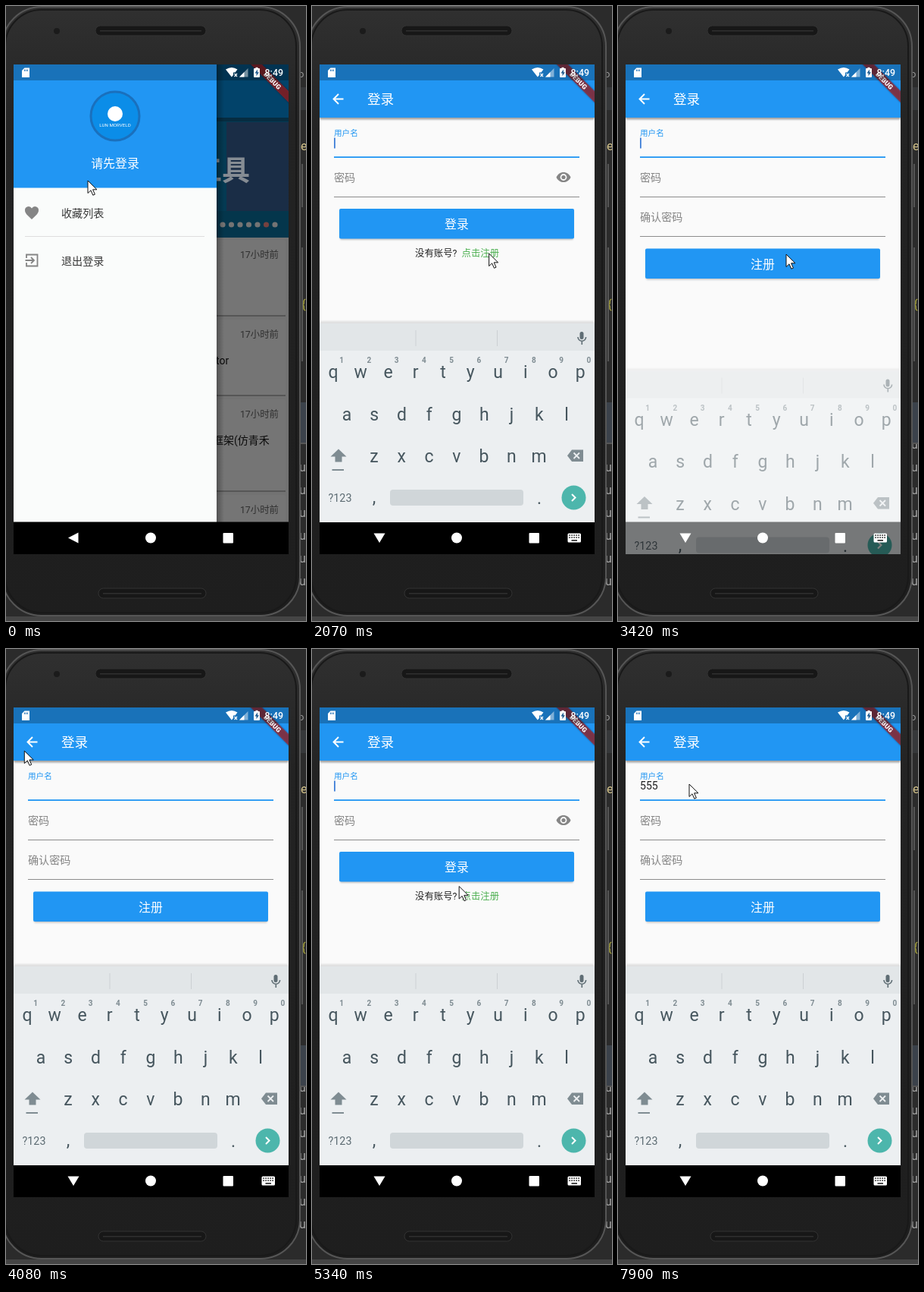
Animation of 396x810 px, one loop 8000 ms. Source, as an HTML page:

```html
<!DOCTYPE html>
<html lang="zh-CN">
<head>
<meta charset="utf-8">
<title>Login and register flow</title>
<style>
html, body { margin: 0; width: 396px; height: 810px; overflow: hidden; background: #2b2b2b; }
svg { display: block; font-family: Roboto, 'Noto Sans CJK SC', 'Noto Sans CJK', sans-serif; }
</style>
</head>
<body>
<svg id="stage" width="396" height="810" viewBox="0 0 396 810"></svg>
<script>
const BLUE = '#2196f3', GREY = '#858585';
const MID = 'text-anchor="middle"', END = 'text-anchor="end"';
const $ = id => document.getElementById(id);
const text = (s, x, y, size, fill, extra = '') =>
  `<text x="${x}" y="${y}" font-size="${size}" fill="${fill}" ${extra}>${s}</text>`;
const rect = (x, y, w, h, fill, extra = '') =>
  `<rect x="${x}" y="${y}" width="${w}" height="${h}" fill="${fill}" ${extra}/>`;
const path = (d, fill, extra = '') => `<path d="${d}" fill="${fill}" ${extra}/>`;
const line = (d, stroke, width) => path(d, 'none', `stroke="${stroke}" stroke-width="${width}"`);
const circle = (x, y, r, fill, extra = '') =>
  `<circle cx="${x}" cy="${y}" r="${r}" fill="${fill}" ${extra}/>`;
const shadow = (x, y, w, h, opacity) =>
  rect(x, y, w, h, '#000', `rx="2" opacity="${opacity}" filter="url(#blur)"`);
const repeat = (n, make) => Array.from({ length: n }, (_, i) => make(i)).join('');

// Desktop editor showing beside the phone, and the phone body
function surroundings() {
  const slot = (x, y, w) => rect(x, y, w, 13, '#171717', 'rx="6.5" stroke="#333"') +
    rect(x + 6, y + 6, w - 12, 1.5, '#303030');
  return rect(0, 0, 396, 810, '#2b2b2b') +
    rect(386, 107, 10, 30, '#36383a') +
    repeat(7, i => text('u', 387, 582.5 + 30 * i, 16, '#a5a5a5', `id="log${i}"`)) +
    rect(386, 522, 10, 53, '#3b424b') + rect(386, 575, 10, 2, '#565656') +
    text('o', 386, 94, 13, '#999') + text('e', 389, 190, 16, '#d6c58b') +
    text('{', 390, 399, 17, '#a9a53d') +
    rect(390, 208, 2, 57, '#555') + rect(390, 318, 2, 150, '#555') +
    rect(0, 804, 396, 6, '#454545') +
    rect(-5, 1, 393, 802, 'url(#body)', 'rx="52" stroke="#565656" stroke-width="2"') +
    rect(-1, 5, 384, 794, 'none', 'rx="48" stroke="#191919" stroke-width="2"') +
    slot(118, 26, 146) + slot(122, 767, 142) + circle(67, 33, 4, '#1b1b1b');
}

function home() {
  const card = (y, h) => rect(278, y, 91, h, '#757575', 'rx="2"') +
    rect(278, y + h, 91, 2, '#565656') + text('17小时前', 360, y + 24, 12.4, '#303030', END);
  return rect(10, 77, 363, 603, '#727272') +
    rect(10, 77, 363, 70, '#02436a') + rect(10, 147, 363, 158, '#043a53') +
    rect(10, 147, 363, 5, '#062c41') + rect(291, 153, 82, 117, '#1a2d46') +
    text('工具', 248, 230, 37, '#858c93', 'font-weight="700"') + rect(10, 270, 363, 35, '#04364c') +
    repeat(7, i => circle(286 + 11.5 * i, 288, 3.6, i === 5 ? '#75413f' : '#747474')) +
    card(308, 99) + card(413, 99) + card(518, 120) + card(644, 40) +
    text('tor', 277, 472, 14, '#0c0c0c') + text('框架(仿青禾', 273, 577, 14, '#0c0c0c');
}

function drawer() {
  return rect(278, 77, 10, 603, 'url(#edge)') + rect(10, 77, 268, 603, '#fafcfb') +
    rect(10, 77, 268, 162.5, BLUE) +
    circle(144, 145, 32, '#0b8de8', 'stroke="#1a70bd" stroke-width="3"') +
    circle(144, 142, 10, '#fff') +
    text('LUN MORVELD', 144, 159, 6.2, '#fff', MID) +
    text('请先登录', 144, 213, 15.9, '#fff', MID) +
    path('M34 281C28 275.5 25 273 25 269a4.8 4.8 0 0 1 9-2.5 4.8 4.8 0 0 1 9 2.5c0 4-3 6.5-9 12z', GREY) +
    text('收藏列表', 73, 278, 14.1, '#363636') + rect(25, 303, 237, 1, '#dedede') +
    line('M27 332v-4.5h14.5v15H27v-4.5M25.5 335h11M33 331l4 4-4 4', GREY, 1.8) +
    text('退出登录', 73, 341, 14.1, '#363636');
}

const field = (label, y) =>
  text(label, 29, y + 5.4, 14.1, GREY) + rect(29, y + 25, 324, 1, '#8c8c8c');

const button = (label, y) => shadow(37, y + 2, 308, 39, .22) +
  rect(36, y, 310, 39.5, BLUE, 'rx="2"') + text(label, 191, y + 26, 15.9, '#fff', MID);

function page(id, rest, ripple = '') {
  return `<g id="${id}">` + rect(10, 77, 363, 640, '#fafafa') +
    shadow(10, 140, 363, 9.5, .35) + rect(10, 77, 363, 70, BLUE) + ripple +
    line('M41.5 122.5H28.5M35 116l-6.5 6.5L35 129', '#fff', 1.9) +
    text('登录', 73, 129.3, 17.6, '#fff') +
    text('用户名', 29, 0, 14, BLUE, `id="${id}Label"`) +
    rect(29, 198, 324, 2, BLUE, `id="${id}Line"`) +
    rect(29, 173.5, 1.8, 14, '#3f7fd8', `id="${id}Caret"`) +
    field('密码', 226) + rest + '</g>';
}

const loginRest =
  path('M322.5 225.5c1.6-4 5.3-6.6 9.5-6.6s7.9 2.6 9.5 6.6c-1.6 4-5.3 6.6-9.5 6.6s-7.9-2.6-9.5-6.6z', GREY) +
  circle(332, 225.5, 4.4, '#fafafa') + circle(332, 225.5, 2.6, GREY) +
  button('登录', 267) + text('没有账号?', 136, 329.5, 12.4, '#222') +
  text('点击注册', 197.5, 329.5, 12.4, '#4caf50');

const registerRest = field('确认密码', 278) + button('注册', 319.5) +
  text('', 29, 185.3, 14.1, '#222', 'id="typed"');

function keyboard() {
  const ink = '#46565e', soft = '#7f8c92', step = 36.25;
  const row = (keys, x, y, size = 23, fill = ink, extra = '') =>
    repeat(keys.length, i => text(keys[i], x + step * i, y, size, fill, MID + extra));
  return shadow(10, 415, 363, 6, .1) +
    rect(10, 418, 363, 262, '#eceff1') + rect(10, 418, 363, 36, '#e2e6e8') +
    rect(136.5, 427, 1, 21, '#cbd0d3') + rect(244, 427, 1, 21, '#cbd0d3') +
    rect(353.5, 429, 5, 10, '#5f6d74', 'rx="2.5"') +
    line('M351 436a5.3 5.3 0 0 0 10.6 0M356.3 441v5', '#5f6d74', 1.6) +
    row('1234567890', 39, 470, 10, soft, ' font-weight="700"') +
    row('qwertyuiop', 28, 490) + row('asdfghjkl', 46, 545.5) + row('zxcvbnm', 82, 601) +
    path('M35 583.5l10.5 10h-6v7h-9v-7h-6z', soft) + rect(26.5, 610, 15.5, 2, soft) +
    path('M343 584.5h15v15.5h-15l-6-7.75z', soft) +
    line('M345.5 588.5l7.5 7.5M353 588.5l-7.5 7.5', '#eceff1', 1.8) +
    text('?123', 37, 653, 14.3, '#5c6b72', MID) + text(',', 82, 655, 23, ink, MID) +
    rect(103, 637, 176, 21, '#d0d6d9', 'rx="4"') + text('.', 300, 656, 23, ink, MID) +
    circle(345.5, 647.5, 16, '#4db6ac') + line('M343 643l4.5 4.5-4.5 4.5', '#fff', 2);
}

function statusBar() {
  return '<g transform="translate(373 77) rotate(45)">' +
    shadow(-40, 24.7, 80, 10.6, .4) + rect(-40, 24.7, 80, 10.6, '#b71c1c', 'opacity=".63"') +
    text('DEBUG', 0, 33.2, 8.8, '#fff', MID + ' font-weight="900"') + '</g>' +
    rect(10, 77, 363, 21, '#000', 'opacity=".24"') +
    path('M24.5 81.5h6.5v12.5H21V85z', '#fff') +
    line('M24.5 83.5v2.5M26.5 83.5v2.5M28.5 83.5v2.5', '#1f70b6', 1) +
    path('M290 83.5q8-5 15.5 0l-3 4h-2.5v3.5l-2.2 2.5z', '#fff') +
    line('M301.5 89l3.5 4M305 89l-3.5 4', '#fff', 1.2) +
    path('M308 93.5h11.5V82z', '#fff', 'opacity=".45"') + path('M308 93.5h6.5V87z', '#fff') +
    rect(327, 82, 8, 12, '#fff', 'rx="1"') + rect(329.5, 80.8, 3, 2, '#fff') +
    path('M332 83.5l-3.5 5h2v3.8l3.5-5h-2z', '#235e91') +
    text('8:49', 366, 92.2, 12.4, '#fff', END + ' font-weight="500"');
}

function navIcons() {
  return path('M95.5 693.5v14L82 700.5z', '#fff', 'id="back"') +
    circle(191, 700.5, 7, '#fff') + rect(286.5, 694, 13.5, 13.5, '#fff', 'rx="1"') +
    '<g id="ime">' + path('M81.5 694.5h15L89 707z', '#fff') +
    rect(337.5, 694.5, 17.5, 12, '#fff', 'rx="1.5"') +
    repeat(10, i => rect(339.3 + 3 * (i % 5), i < 5 ? 696.3 : 699.3, 1.6, 1.6, '#222')) +
    rect(342.5, 703, 7.5, 1.6, '#222') + '</g>';
}

$('stage').innerHTML = `<defs>
  <linearGradient id="body" x2="0" y2="1"><stop stop-color="#303030"/><stop offset=".2" stop-color="#232323"/><stop offset="1" stop-color="#1e1e1e"/></linearGradient>
  <linearGradient id="edge"><stop stop-color="#000" stop-opacity=".3"/><stop offset="1" stop-color="#000" stop-opacity="0"/></linearGradient>
  <filter id="blur" x="-10%" y="-60%" width="120%" height="220%"><feGaussianBlur stdDeviation="1.3"/></filter>
  <clipPath id="screen"><rect x="10" y="77" width="363" height="645"/></clipPath></defs>` +
  surroundings() + '<g clip-path="url(#screen)">' +
  `<g id="home">${home()}${drawer()}</g>` + page('login', loginRest) +
  page('register', registerRest, circle(35, 123, 30, '#fff', 'id="ripple" opacity=".1"')) +
  statusBar() + rect(10, 679.5, 363, 43, '#000') +
  `<g id="keyboard">${keyboard()}</g>${navIcons()}</g>` +
  path('M0 0v16.5l4-3.7 2.8 6.4 2.6-1.1-2.8-6.3h5.4z', '#fff', 'id="mouse" stroke="#111"');

// Main moments, in ms
const LOGIN = 1350, KEYS = 1470, BLUR = 3170, PUSH = 3270, POP = 4620, REFOCUS = 5040, PUSH_AGAIN = 6040, TYPE = 7510;
const STEP = 150, SLIDE = 283, GLIDE = 300;

const clamp = v => Math.min(1, Math.max(0, v));
const smooth = p => p * p * (3 - 2 * p);
const ramp = (t, start, length) => clamp(Math.floor((t - start) / STEP) * STEP / length);

// Where the pointer comes to rest: arrival time, x, y
const rests = [
  [300, 125, 211], [640, 135, 225], [2070, 234, 326], [2340, 222, 327], [3810, 71, 199],
  [4080, 23, 135], [4320, 35, 127], [4770, 85, 229], [5190, 177, 304], [5490, 211, 321],
  [6190, 130, 180], [6490, 94, 178]
];
const pointer = t => rests.reduce(([x, y], [arrival, toX, toY]) => {
  const p = smooth(clamp(1 + (t - arrival) / GLIDE));
  return [x + (toX - x) * p, y + (toY - y) * p];
}, [108, 230]);

// While a text field owns the caret it blinks evenly
const caretSpells = [[1710, 3020], [3420, 4770], [REFOCUS, PUSH_AGAIN], [PUSH_AGAIN, TYPE]];
const caretOn = t => caretSpells.some(([from, to]) =>
  t >= from && t < to && Math.floor((t - from) / 510) % 2 === 0);

// The keyboard drops and comes back whenever the focused field changes
const drops = [[BLUR - 300, PUSH, 300], [REFOCUS - STEP, REFOCUS, STEP], [PUSH_AGAIN - STEP, PUSH_AGAIN, 300]];

const show = (id, on) => $(id).setAttribute('visibility', on ? 'inherit' : 'hidden');
const set = (id, attrs) => Object.entries(attrs).forEach(([k, v]) => $(id).setAttribute(k, v));

function setFocus(id, focused, caret) {
  const size = focused ? 10.6 : 14.1;
  set(id + 'Label', {
    'font-size': size, y: (focused ? 166.5 : 174) + size * .38, fill: focused ? BLUE : GREY
  });
  set(id + 'Line', { y: focused ? 198.2 : 199, height: focused ? 1.8 : 1, fill: focused ? BLUE : '#8c8c8c' });
  show(id + 'Caret', focused && caret);
}

function draw() {
  const t = performance.now() % 8000;
  const caret = caretOn(t);

  show('home', t < LOGIN);
  show('login', t >= LOGIN);
  setFocus('login', t < BLUR || (t >= REFOCUS && t < PUSH_AGAIN + STEP), caret);
  setFocus('register', true, caret);

  const route = ramp(t, PUSH, STEP) - ramp(t, POP, SLIDE) + ramp(t, PUSH_AGAIN, SLIDE);
  set('register', { opacity: route ** 1.25, transform: `translate(0 ${160 * (1 - route) ** 3})` });
  show('ripple', t >= POP + STEP && t < PUSH_AGAIN);
  $('typed').textContent = '5'.repeat(3 * clamp(Math.floor((t - TYPE) / 125) / 3) + .1);

  const falls = drops.map(([start]) => ramp(t, start, 300) ** 2.5);
  const rises = drops.map(([, start, length]) => ramp(t, start, length));
  const raised = t < KEYS ? 0 : falls.reduce((v, fall, i) => clamp(v - fall + rises[i]), 1);
  set('keyboard', { opacity: raised, transform: `translate(0 ${250 * (1 - raised) ** 2})` });
  const inputMode = t >= LOGIN && !falls.some(fall => fall > 0 && fall < 1);
  show('back', !inputMode);
  show('ime', inputMode);

  show('log0', t >= 2340);
  show('log5', t < 5920);
  set('mouse', { transform: `translate(${pointer(t)})` });
  requestAnimationFrame(draw);
}
draw();
</script>
</body>
</html>
```
